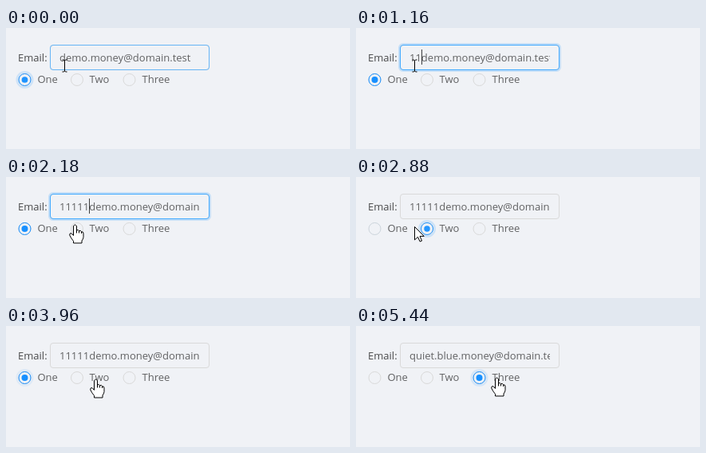
Animation of 431x152 px, one loop 5610 ms. Source, as an HTML page with a canvas:

```html
<!DOCTYPE html>
<html lang="en">
<head>
<meta charset="utf-8">
<title>Email form</title>
<style>
  html, body { margin: 0; width: 100%; height: 100%; overflow: hidden; background: #f0f2f6; }
  canvas { display: block; width: 431px; height: 152px; }
</style>
</head>
<body>
<canvas id="stage"></canvas>
<script>
const W = 431, H = 152, LOOP = 5610;
const BG = '#f0f2f6', GREY = '#d9d9d9';
const FONT = '13px "Open Sans", "Noto Sans", sans-serif';
const FIRST_MAIL = 'demo.money@domain.test';
const OTHER_MAIL = 'quiet.blue.money@domain.test';

const canvas = document.getElementById('stage');
const ctx = canvas.getContext('2d');
const dpr = window.devicePixelRatio || 1;
canvas.width = W * dpr;
canvas.height = H * dpr;

const FOCUS = 150, BLUR = 2580, SWAP = 5130;
const FIRST_KEY = 920, KEY_GAP = 235, KEYS = 5, BLINK = 535;

const radios = ['One', 'Two', 'Three'].map((text, i) => ({ text, x: 23.5 + 65.5 * i }));
const picks = [
  { at: -200, radio: 0 }, { at: 2700, radio: 1 }, { at: 3400, radio: 0 },
  { at: 4040, radio: 1 }, { at: SWAP, radio: 2 }
];

const spots = {
  field: [72.5, 46.5], below: [65.5, 58], two: [86, 59], gap: [73.5, 61.5],
  one: [62.5, 64], far: [193, 64], twoLabel: [112, 66], three: [175.5, 64]
};
// The pointer leaves for each spot at `from` and is there at `to`.
const moves = [
  { from: 1300, to: 1630, spot: 'below' },
  { from: 2030, to: 2180, spot: 'two' },
  { from: 2700, to: 2880, spot: 'gap' },
  { from: 2880, to: 3130, spot: 'one' },
  { from: 3580, to: 3730, spot: 'far' },
  { from: 3730, to: 3960, spot: 'twoLabel' },
  { from: 4120, to: 4420, spot: 'three' }
];

const clamp = v => Math.max(0, Math.min(1, v));
const easeOut = v => 1 - (1 - clamp(v)) ** 3;
const smooth = v => clamp(v) ** 2 * (3 - 2 * clamp(v));
const blue = a => `rgba(24,144,255,${a})`;
const within = (t, a, b) => t >= a && t < b;

function pointerAt(t) {
  let [x, y] = spots.field;
  for (const { from, to, spot } of moves) {
    const k = smooth((t - from) / (to - from));
    x += (spots[spot][0] - x) * k;
    y += (spots[spot][1] - y) * k;
  }
  return [x, y];
}

function label(text, x, y, alpha = 0.6) {
  ctx.fillStyle = `rgba(0,0,0,${alpha})`;
  ctx.fillText(text, x, y);
}

function box(x, y, w, h, r, color, width) {
  ctx.beginPath();
  ctx.roundRect(x, y, w, h, r);
  ctx.strokeStyle = color;
  ctx.lineWidth = width;
  ctx.stroke();
}

function ring(x, y, r, color, width) {
  ctx.beginPath();
  ctx.arc(x, y, r, 0, Math.PI * 2);
  ctx.strokeStyle = color;
  ctx.lineWidth = width;
  ctx.stroke();
}

function drawInput(t) {
  const glow = easeOut((t - FOCUS) / 300) - easeOut((t - BLUR) / 300);
  const border = t < BLUR ? 0.75 + 0.25 * glow : glow;
  box(54, 20, 202, 34, 5, blue(0.2 * glow), 2);
  box(55.5, 21.5, 199, 31, 3.5, GREY, 1);
  box(55.5, 21.5, 199, 31, 3.5, `rgba(64,169,255,${border})`, 1);

  const count = Math.max(0, Math.min(KEYS, Math.floor((t - FIRST_KEY) / KEY_GAP) + 1));
  const ones = '1'.repeat(count);
  ctx.save();
  ctx.beginPath();
  ctx.rect(67, 22, 176, 30);
  ctx.clip();
  label(t >= SWAP ? OTHER_MAIL : ones + FIRST_MAIL, 67, 42);

  const blinkStart = count ? FIRST_KEY + (count - 1) * KEY_GAP : FOCUS;
  const lit = Math.floor((t - blinkStart) / BLINK) % 2 === 0;
  if (within(t, FOCUS, BLUR) && lit) {
    ctx.fillStyle = 'rgba(0,0,0,.75)';
    ctx.fillRect(67 + Math.round(ctx.measureText(ones).width), 27, 1, 19);
  }
  ctx.restore();
}

function drawRadios(t) {
  const now = picks.findLastIndex(p => t >= p.at);
  const age = t - picks[now].at;
  const chosen = picks[now].radio;
  const last = picks[now - 1]?.radio;
  const grow = easeOut(age / 300);
  const y = 65;
  radios.forEach(({ text, x }, i) => {
    const on = i === chosen ? grow : i === last ? 1 - grow : 0;
    if (i === chosen) {
      const stay = t < BLUR ? 1 - easeOut((t - FOCUS) / 300) : 1;
      ring(x, y, 9.5, blue((0.08 + 0.15 * (1 - clamp(age / 420))) * stay), 3);
    }
    ring(x, y, 7.5, GREY, 1);
    ring(x, y, 7.5, blue(on), 1);
    ctx.beginPath();
    ctx.arc(x, y, 4 * on, 0, Math.PI * 2);
    ctx.fillStyle = blue(on);
    ctx.fill();
    label(text, Math.round(x) + 15.5, 69);
  });
}

const arrow = new Path2D('M0 0V16.5L4 12.8L6.6 18.6L9 17.6L6.5 11.9H11.7Z');
const beam = new Path2D('M-3 -7.5H-1L0 -6.5L1 -7.5H3M0 -6.5V6.5M-3 7.5H-1L0 6.5L1 7.5H3');
const hand = new Path2D('M-2 2Q0 -1 2 2V7.5Q4 6 5 8.3Q7 6.8 8 9.3Q10.5 8.8 10.5 11.5V16' +
  'Q10.3 18.5 8.5 20.5V23.5H-2V21Q-5 17.5 -6.8 13.5Q-6.8 10.5 -4.5 11.2L-2 14Z');
const knuckles = new Path2D('M2 7.5V11M5 8.3V11M8 9.3V11.5');

function drawPointer(t) {
  const isBeam = t < 1600;
  const isArrow = within(t, 1600, 2100) || within(t, 2780, 3050);
  ctx.save();
  ctx.translate(...pointerAt(t).map(v => Math.round(v) + 0.5));
  ctx.strokeStyle = '#000';
  ctx.fillStyle = '#fff';
  ctx.lineWidth = 1;
  ctx.lineJoin = 'round';
  if (isBeam) {
    ctx.stroke(beam);
  } else {
    const shape = isArrow ? arrow : hand;
    ctx.fill(shape);
    ctx.stroke(shape);
    if (!isArrow) ctx.stroke(knuckles);
  }
  ctx.restore();
}

function draw(t) {
  ctx.setTransform(dpr, 0, 0, dpr, 0, 0);
  ctx.fillStyle = BG;
  ctx.fillRect(0, 0, W, H);
  ctx.font = FONT;
  label('Email:', 15, 42, 0.7);
  drawInput(t);
  drawRadios(t);
  drawPointer(t);
}

const start = performance.now();
function loop() {
  draw((performance.now() - start) % LOOP);
  requestAnimationFrame(loop);
}
loop();
</script>
</body>
</html>
```
